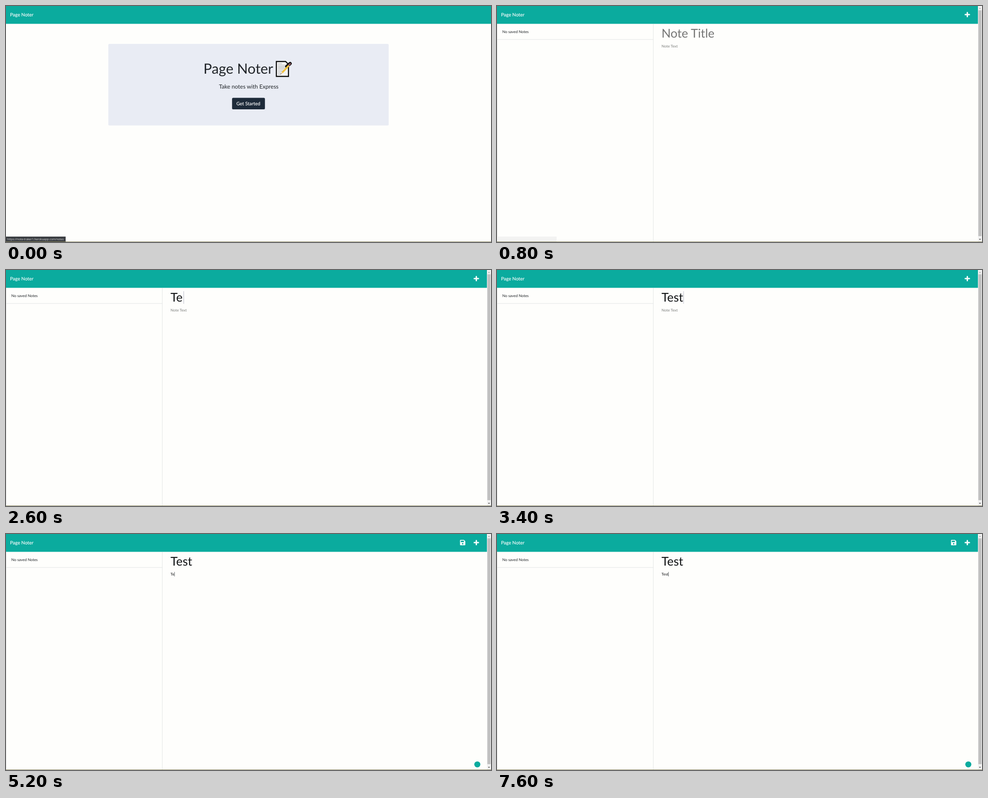
Animation, 1071 px wide and 523 px high, one loop 8 s. Source, as an HTML page:

```html
<!DOCTYPE html>
<html lang="en">
<head>
<meta charset="utf-8">
<title>Page Noter</title>
<style>
  html, body { margin: 0; width: 100%; height: 100%; overflow: hidden; background: #fefefc; }
  svg { display: block; width: 100vw; height: 100vh; }
  text { font-family: Lato, "Open Sans", sans-serif; font-size: 8.37px; text-rendering: geometricPrecision; white-space: pre; }
  .brand, .button { font-size: 10.46px; fill: #fff; stroke: #fff; stroke-width: .15; }
  .heading { font-size: 31.2px; fill: #212529; }
  .lead { font-size: 12.55px; fill: #212529; }
  .title { font-size: 26.8px; }
  .url { font-family: "Open Sans", "Noto Sans", sans-serif; font-size: 6.3px; fill: #d4d6d8; }
  .rule { stroke: #e3e4e4; }
</style>
</head>
<body>
<svg viewBox="0 0 1071 523" preserveAspectRatio="none">
  <rect width="1071" height="523" fill="#fefefc"/>
  <rect id="bar" width="1071" height="39.5" fill="#0bab9e"/>
  <text class="brand" x="9" y="23.3">Page Noter</text>

  <g id="home">
    <rect x="226" y="84" width="619" height="180.7" rx="2.5" fill="#e9ecf4"/>
    <text class="heading" x="436" y="150.3">Page Noter</text>
    <g stroke-linejoin="round" stroke-linecap="round">
      <path d="M597 123H617.5L623.8 129.5V156H597Z" fill="#f4f4f4" stroke="#0b0b0b" stroke-width="2.4" stroke-linejoin="miter"/>
      <path d="M601 128H609M601 131.3H617M601 134.6H619M601 137.9H616M601 141.2H613M601 144.5H610M601 147.8H607M601 151.1H605" stroke="#a9abad" stroke-width="1.1"/>
      <path d="M620 134L627.5 127.5" stroke="#0b0b0b" stroke-width="7"/>
      <path d="M610 147.5L625 131.5" stroke="#f2c23d" stroke-width="4" stroke-linecap="butt"/>
      <path d="M606.5 151.3L608.4 146L611.6 149Z" fill="#efd3a4"/>
      <path d="M606.3 151.5L607.3 149.5" stroke="#3d3a35"/>
      <path d="M625 130.8L627.7 128" stroke="#8b5960" stroke-width="3.5"/>
    </g>
    <text class="lead" x="470.3" y="182.5">Take notes with Express</text>
    <rect id="ring" x="498.2" y="202.7" width="74.6" height="27.2" rx="3.2" fill="#8a95a3"/>
    <rect id="button" x="499.2" y="203.6" width="72.6" height="25.4" rx="2.5"/>
    <text class="button" x="508.8" y="220">Get Started</text>
    <rect y="511" width="131.7" height="11.5" fill="#3b3e42"/>
    <text class="url" x="2.8" y="519">https://note-traker1.herokuapp.com/notes</text>
  </g>

  <g id="notes">
    <path class="rule" d="M.5 40V522M0 74.2H345M345.2 40V522"/>
    <text x="11.8" y="60" fill="#212529">No saved Notes</text>
    <text id="title" class="title" x="363.2" y="70.3"></text>
    <text id="body" x="363.3" y="92.4"></text>
    <rect id="titleCaret" y="47" width="1" height="28" fill="#b9bcc9"/>
    <rect id="bodyCaret" y="84" width="1" height="10" fill="#62666a"/>
    <path d="M1034 19H1043.2M1038.6 14.4V23.6" stroke="#f6fcfb" stroke-width="3" stroke-linecap="round"/>
    <path id="save" fill="#f6fcfb" fill-rule="evenodd" d="M1003.8 13H1011.2L1014.3 16.1V23.8Q1014.3 25 1013.1 25H1003.8Q1002.6 25 1002.6 23.8V14.2Q1002.6 13 1003.8 13ZM1004.4 14.8V18H1011V14.8ZM1008.4 19.9A1.7 1.7 0 1 0 1008.4 23.3A1.7 1.7 0 1 0 1008.4 19.9Z"/>
    <circle id="badge" cx="1040.8" cy="510.6" r="6.7" fill="#0bab9e"/>
    <rect x="1062" width="9" height="523" fill="#f1f1f1"/>
    <rect x="1063" y="9.5" width="7" height="500.5" fill="#c1c1c1"/>
    <path d="M1064.3 6.2H1068.7L1066.5 3.8Z" fill="#a3a3a3"/>
    <path d="M1064.3 516H1068.7L1066.5 518.5Z" fill="#505050"/>
    <rect id="ghost" y="511" width="131.7" height="11" fill="#f3f3f2"/>
  </g>
  <rect y="522" width="1071" height="1" fill="#85825a"/>
</svg>
<script>
  const LOOP = 8000;
  const WORD = "Test";
  const TITLE_KEYS = [2400, 2600, 2800, 3000];
  const BODY_KEYS = [5000, 5200, 5400, 5600];
  const TITLE_CARETS = [363, 378, 392, 402, 411.5];
  const BODY_CARETS = [363, 367.6, 371.6, 375, 378.2];

  const el = id => document.getElementById(id);
  const show = (id, on) => el(id).style.display = on ? "" : "none";
  const within = (t, ...spans) => spans.some(([from, to]) => t >= from && t < to);

  function field(id, caretId, t, keys, carets, hint, hintColor, caretOn) {
    const typed = keys.filter(key => t >= key).length;
    el(id).textContent = typed ? WORD.slice(0, typed) : hint;
    el(id).setAttribute("fill", typed ? "#101214" : hintColor);
    el(caretId).setAttribute("x", carets[typed]);
    show(caretId, caretOn);
  }

  function draw(t) {
    const onNotes = t >= 800;
    show("home", !onNotes);
    show("notes", onNotes);
    el("bar").setAttribute("width", onNotes ? 1062 : 1071);

    el("button").setAttribute("fill", t < 400 ? "#1e2b3a" : "#172431");
    show("ring", t >= 400);
    show("ghost", t < 1000);

    field("title", "titleCaret", t, TITLE_KEYS, TITLE_CARETS,
      "Note Title", "#757575", within(t, [1400, 3600]));
    field("body", "bodyCaret", t, BODY_KEYS, BODY_CARETS,
      "Note Text", "#7c7e7c",
      within(t, [3800, 4400], [4800, 6000], [6600, 7200], [7600, LOOP]));
    show("save", t >= BODY_KEYS[0]);
    show("badge", t >= 4600);
  }

  const start = performance.now();
  function tick() {
    draw((performance.now() - start) % LOOP);
    requestAnimationFrame(tick);
  }
  tick();
</script>
</body>
</html>
```
